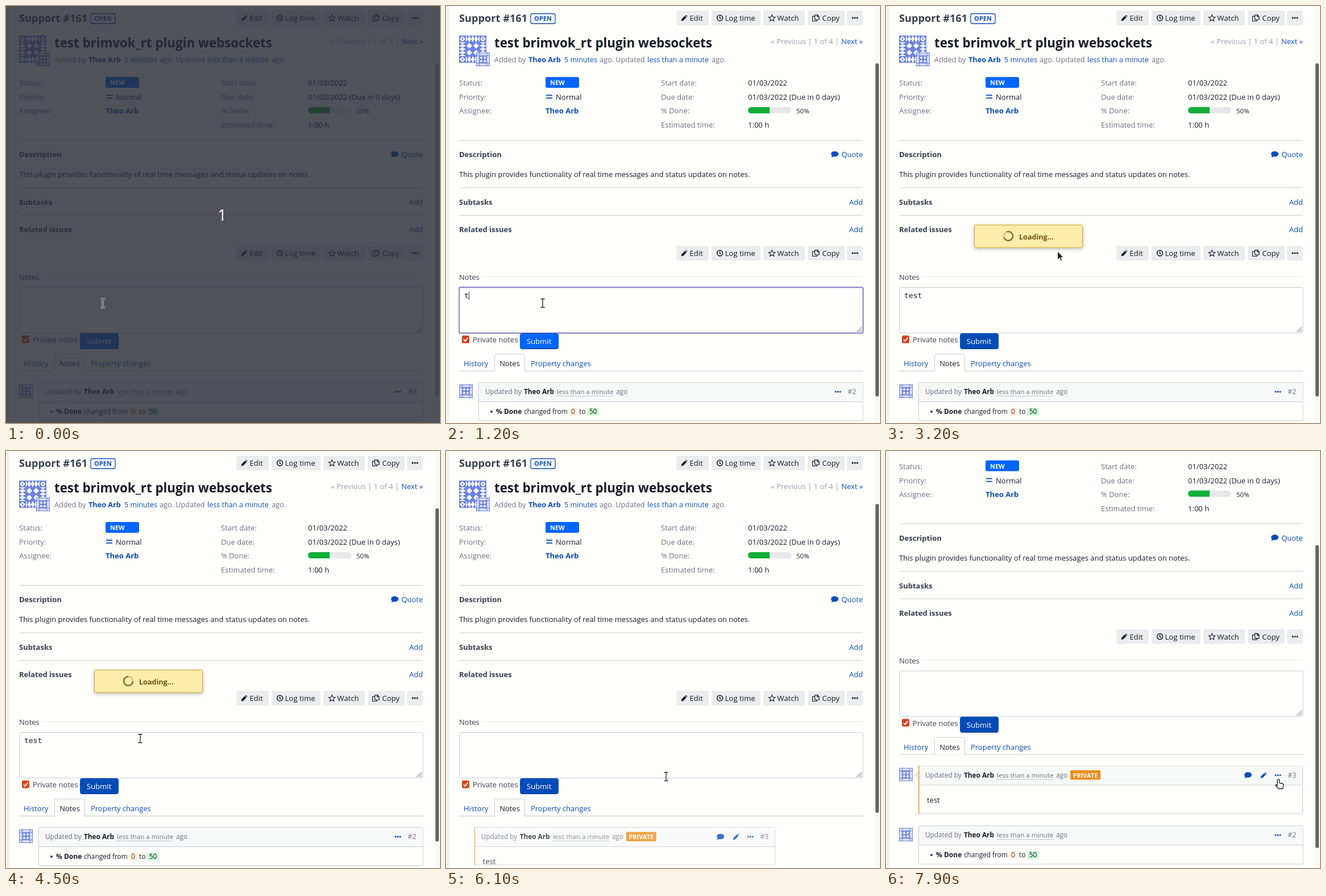
Animation of 763 by 734 pixels, one loop 8000 ms. Source, as an HTML page:

```html
<!DOCTYPE html>
<html lang="en">
<head>
<meta charset="utf-8">
<title>Issue notes</title>
<style>
  html, body { margin: 0; width: 100%; height: 100%; overflow: hidden; background: #fffffb; }
  svg { display: block; }
  text { font-family: 'Open Sans', 'Noto Sans', sans-serif; white-space: pre; }
  .mono { font-family: 'DejaVu Sans Mono', monospace; }
</style>
</head>
<body>
<script>
const INK = '#171b27', DARK = '#363e4f', GREY = '#687082', PALE = '#9a9fab',
      LINK = '#0a4bb8', BLUE = '#0065ff', EDGE = '#c8cbd6', BG = '#fffffb';
const NAME = 'Theo Arb';

// y is the middle of the capitals
const text = (x, y, s, fill = INK, size = 13, { bold, anchor = 'start' } = {}) =>
  `<text x="${x}" y="${Math.round(y + size * .36)}" fill="${fill}" font-size="${size}" text-anchor="${anchor}"` +
  `${bold ? ' font-weight="700"' : ''}>${s}</text>`;
const B = { bold: true }, MID = { anchor: 'middle' }, END = { anchor: 'end' };
const rect = (x, y, w, h, fill, r = 0, more = '') =>
  `<rect x="${x}" y="${y}" width="${w}" height="${h}" rx="${r}" fill="${fill}" ${more}/>`;
const line = (x1, y, x2, color = EDGE, more = '') =>
  `<path d="M${x1} ${y}H${x2}" stroke="${color}" fill="none" ${more}/>`;
const at = (x, y, s) => `<g transform="translate(${x} ${y})">${s}</g>`;

const dots = (x, y, c = INK) => [-4, 0, 4].map(d => rect(x + d - 1.4, y - 1.4, 2.8, 2.8, c, 1)).join('');
const pencil = (x, y, c = INK) => at(x - 5.5, y - 5.5,
  `<path fill="${c}" d="M0 11L.8 7.4 6.6 1.6 9.4 4.4 3.6 10.2ZM7.4.8q1-1 2 0l.8.8q1 1 0 2z"/>`);
const bubble = (x, y) => at(x, y,
  `<path fill="${LINK}" d="M-6.5-.5a6.5 4.8 0 1 1 6.5 4.8q-1.6 0-2.8-.4Q-4.5 5.5-6.5 5.5-5 4-5 2.6-6.5 1.2-6.5-.5z"/>`);
const clock = (x, y) => at(x, y,
  `<g fill="none" stroke="${INK}" stroke-width="1.5"><circle r="5"/><path d="M0-3V.4L2 1.6"/></g>`);
const star = (x, y) => {
  const pts = Array.from({ length: 10 }, (_, i) => {
    const r = i % 2 ? 2.7 : 6, a = i * Math.PI / 5;
    return `${(r * Math.sin(a)).toFixed(2)},${(-r * Math.cos(a)).toFixed(2)}`;
  });
  return at(x, y + .5, `<polygon points="${pts.join(' ')}" fill="none" stroke="${INK}" stroke-width="1.1"/>`);
};
const copy = (x, y) => at(x, y,
  `<path fill="none" stroke="${INK}" stroke-width="1.2" d="M-1.5-5.5H3L6-2.5V3H-1.5ZM2.5-5.5V-2H6M-1.5-2.8H-5.5V5.5H2V3"/>`);

const toolbar = y => [[405, 57], [467, 86], [558, 73], [636, 65], [705, 28]]
    .map(([x, w]) => rect(x, y - 13, w, 26, '#ebecee', 3)).join('') +
  pencil(419, y) + clock(481.5, y) + star(573, y) + copy(650, y) + dots(719, y) +
  [[440, 'Edit'], [517, 'Log time'], [601.5, 'Watch'], [676.5, 'Copy']]
    .map(([x, s]) => text(x, y, s, INK, 13.2, MID)).join('');

const avatar = (x, y, size) => `<use href="#avatar" x="${x}" y="${y}" width="${size}" height="${size}"/>`;
const quarter = `<path id="quarter" fill-rule="evenodd" d="M0 0H12V12H0ZM6 1L11 6 6 11 1 6Z
  M4 6L6 4 8 6 6 8ZM12 0H18L15 6ZM18 0H24L21 6ZM12 12L15 6 18 12ZM18 12L21 6 24 12Z
  M0 12L6 15 0 18ZM0 18L6 21 0 24ZM12 12L6 15 12 18ZM12 18L6 21 12 24Z
  M12 12H24V24H12ZM18 13L23 18 18 23 13 18Z"/>`;

const noteHead =
  text(12, 17, 'Updated by', GREY, 11.8) + text(80, 17, NAME, INK, 11.8, B) +
  text(138, 17, 'less than a minute', GREY, 11.6) +
  line(138, 24.5, 238, GREY, 'stroke-dasharray="1 1.5"') + text(242, 17, 'ago', GREY, 11.8);
const noteEnd = id => dots(-44, 17, LINK) + text(-12, 17, id, GREY, 12, END);
const beak = color => `<path d="M.5 11L-5 17 .5 23" fill="#f7f8f8" stroke="${color}"/>`;

const facts = [
  [23, 135, 'Status:'], [23, 160, 'Priority:'], [23, 184.5, 'Assignee:'],
  [378, 135, 'Start date:'], [378, 160, 'Due date:'], [378, 184.5, '% Done:'], [378, 209, 'Estimated time:'],
].map(([x, y, s]) => text(x, y, s, GREY)).join('');

const header =
  text(23, 21, 'Support #161', DARK, 18.2, B) +
  rect(149, 13.5, 43, 17.5, '#fff', 3, `stroke="${LINK}" stroke-width="1.3"`) +
  text(170.5, 22, 'OPEN', LINK, 11, { bold: true, anchor: 'middle' }) +
  toolbar(21) + avatar(23, 52, 48) + rect(53, 82, 24, 24, BG) + avatar(53, 82, 24) +
  text(85, 65, 'test brimvok_rt plugin websockets', INK, 22.3, B) +
  text(691, 62, '« Previous | 1 of 4 |', PALE, 13, END) + text(733, 62, 'Next »', LINK, 13, END) +
  text(85, 94, 'Added by', GREY, 12.7) + text(145, 94, NAME, LINK, 12.7, B) +
  text(208, 94, '5 minutes', LINK, 12.5) + text(270, 94, 'ago. Updated', GREY, 12.7) +
  text(354, 94, 'less than a minute', LINK, 12.6) + text(467, 94, 'ago.', GREY, 12.7);

const details = facts +
  rect(175, 125, 59, 19, BLUE, 3) + text(183, 135, 'NEW', '#fff', 11, B) +
  rect(176, 156, 11, 2, '#1a5fc0') + rect(176, 161, 11, 2, '#1a5fc0') + text(193, 160, 'Normal') +
  text(175, 184.5, NAME, LINK, 13, B) +
  text(531, 135, '01/03/2022') + text(531, 160, '01/03/2022 (Due in 0 days)') +
  rect(531, 178, 76, 11, '#e6e8ea', 5.5) + `<path fill="#12ae37" d="M569 178v11H536.5a5.5 5.5 0 0 1 0-11z"/>` +
  text(616, 185, '50%', INK, 11.5) + text(531, 209, '1:00 h') +
  [236.5, 320, 368.5].map(y => line(23, y, 733)).join('') +
  text(23, 261, 'Description', DARK, 13, B) + bubble(683.5, 261) + text(733, 261, 'Quote', LINK, 13, END) +
  text(23, 296, 'This plugin provides functionality of real time messages and status updates on notes.', INK, 12.93) +
  text(23, 345, 'Subtasks', DARK, 13, B) + text(733, 345, 'Add', LINK, 13, END) +
  text(23, 393.5, 'Related issues', DARK, 13, B) + text(733, 393.5, 'Add', LINK, 13, END) + toolbar(435);

const form =
  text(23, 477, 'Notes', DARK) + line(64, 476.5, 733, '#e8e9ea') +
  rect(23.5, 495.5, 709.5, 80, '#fffffd', 2, `stroke="${EDGE}"`) +
  `<g id="focus">${rect(22.5, 494.5, 711.5, 82, 'none', 3, 'stroke="#cfc6ea" stroke-width="2"')}
   ${rect(23.5, 495.5, 709.5, 80, 'none', 2, 'stroke="#7f70bd" stroke-width="1.3"')}</g>` +
  `<path d="M722 574l9-9M725.5 574l5.5-5.5M729 574l2-2" stroke="#666" fill="none"/>` +
  `<text id="typed" class="mono" x="32" y="514" font-size="13" fill="${INK}"></text>` +
  rect(0, 503, 1, 14, INK, 0, 'id="caret"') +
  rect(28, 580, 13, 13.5, '#d9431c', 2.5) +
  `<path d="M31 587l2.7 2.8 4.6-6" stroke="#fff" stroke-width="1.8" fill="none"/>` +
  text(47, 587, 'Private notes', DARK) +
  rect(130.5, 576.5, 67, 27, BLUE, 3, 'id="submit" stroke="#0a4fc4"') + line(132, 603.5, 196, '#073a8c') +
  text(163.5, 590, 'Submit', '#fff', 13.2, MID) +
  line(23, 642.5, 733) +
  `<path d="M85.5 643V615.5q0-3 3-3H135.5q3 0 3 3V643" fill="${BG}" stroke="${EDGE}"/>` +
  text(31, 629, 'History', LINK) + text(112, 629, 'Notes', INK, 13, MID) + text(149, 629, 'Property changes', LINK);

const oldNote = avatar(23, 666, 24) + at(57, 662,
  rect(.5, .5, 675.5, 67.5, BG, 2, `stroke="${EDGE}"`) + rect(1, 1, 674.5, 33, '#f7f8f8') + line(0, 34.5, 676) +
  beak('#e2e4e8') + noteHead + at(676, 0, noteEnd('#2')) +
  `<circle cx="23" cy="52" r="2" fill="${DARK}"/>` + text(31, 52, '% Done', INK, 12, B) +
  text(80, 52, 'changed from', INK, 11.8) + rect(160, 45, 13, 14, '#fdeedd', 2) + text(166.5, 52, '0', '#7a3a10', 12, MID) +
  text(177, 52, 'to', INK, 12) + rect(191, 45, 21, 14, '#cdf9d8', 2) + text(201.5, 52, '50', INK, 12, MID));

const newNote =
  `<g id="badge">${avatar(23, 666, 24)}${at(57, 662, beak('#f0a03c'))}</g>
  <svg id="note" y="662">
    ${rect(.5, .5, 0, 0, BG, 2, `id="frame" stroke="${EDGE}"`)}
    <rect id="bar" x="1" y="1" height="33" fill="#f7f8f8"/>
    ${line(0, 34.5, 676)}${noteHead}
    ${rect(267, 8.5, 53, 16.5, '#ee8a16', 1.5)}${text(293.5, 17, 'PRIVATE', '#fff', 11, { bold: true, anchor: 'middle' })}
    <g id="end">${bubble(-96.5, 17) + pencil(-69, 17, LINK) + noteEnd('#3')}</g>
    ${text(15, 60, 'test')}
    <rect width="1.5" height="85" fill="#f0961e"/>
  </svg>`;

const loading = `<g id="loading">
  ${rect(155.5, 385.5, 190, 39.5, '#feecac', 2, 'stroke="#d6a62c" filter="url(#shade)"')}
  <circle cx="215" cy="405" r="8" fill="none" stroke="#d5c587" stroke-width="2.6"/>
  <path id="spin" d="M215 397a8 8 0 1 1-8 8" fill="none" stroke="#85773d" stroke-width="2.6"/>
  ${text(234, 406, 'Loading...', '#6a5312', 12.6, B)}</g>`;

const beam = 'M-3.5-7.5H-1L0-6.5 1-7.5H3.5M0-6.5V6.5M-3.5 7.5H-1L0 6.5 1 7.5H3.5';
const pointers = {
  beam: `<g fill="none"><path d="${beam}" stroke="#fff" stroke-width="3"/>
    <path d="${beam}" stroke="#222" stroke-width="1.3"/></g>`,
  hand: `<path d="M-1.7 10V1.5a1.7 1.7 0 0 1 3.4 0V6.3L7 7.5q2 .5 1.7 3L7.5 16.5H0L-5 10.5q.2-2.3 3.3.6z"
    fill="#fff" stroke="#222" stroke-width="1.3" stroke-linejoin="round"/>`,
  arrow: `<path d="M0 0V15L3.5 11.8 6 17.3 8.4 16.2 6 11H10.7Z" fill="#222" stroke="#fff"/>`,
};

document.body.innerHTML = `<svg width="763" height="734" viewBox="0 0 763 734">
  <defs>${quarter}
    <symbol id="avatar" viewBox="0 0 48 48"><g fill="#6c82e0">
      ${[0, 90, 180, 270].map(a => `<use href="#quarter" transform="rotate(${a} 24 24)"/>`).join('')}</g></symbol>
    <filter id="shade" x="-10%" y="-30%" width="120%" height="180%">
      <feDropShadow dx="0" dy="2" stdDeviation="3" flood-opacity=".3"/></filter>
  </defs>
  ${rect(0, 0, 763, 734, BG)}
  <path d="M3.5 0V734" stroke="#d3d5dc"/>
  <g id="page">${header}${details}${form}<g id="old">${oldNote}</g>${newNote}</g>
  ${loading}
  ${rect(753, 0, 10, 734, '#f9f9f6')}
  ${rect(755, 0, 6, 0, '#666', 3, 'id="thumb"')}
  <g id="shroud">${rect(0, 0, 763, 734, '#282b34', 0, 'opacity=".81"')}${text(380, 368, '1', '#fff', 28, MID)}</g>
  <g id="pointer">${Object.entries(pointers).map(([k, s]) => `<g id="${k}">${s}</g>`).join('')}</g>
</svg>`;

const $ = id => document.getElementById(id);
const set = (id, attrs) => { for (const k in attrs) $(id).setAttribute(k, attrs[k]); };
const show = (id, on) => set(id, { display: on ? 'inline' : 'none' });

// time, x, y of the mouse
const path = [
  [0, 170, 523], [1900, 170, 523], [2100, 151, 570], [2500, 151, 570], [3300, 323, 412], [4200, 190, 412],
  [4500, 236, 506], [5100, 358, 524], [6000, 387, 573], [6300, 387, 573], [6600, 436, 537],
  [7100, 436, 537], [7900, 690, 578], [8000, 690, 578],
];
function mouse(t) {
  const i = path.findIndex(k => k[0] > t), [t0, x0, y0] = path[i - 1], [t1, x1, y1] = path[i];
  const u = (t - t0) / (t1 - t0);
  return [x0 + (x1 - x0) * u, y0 + (y1 - y0) * u];
}

const SENT = 2500, ANSWER = 5685, SCROLL = 7000;
function draw(t) {
  show('shroud', t < 100);

  const focus = t < 400 || t >= SENT ? 0 : t < 500 ? .5 : 1;
  const typed = t >= ANSWER ? 0 : [1200, 1300, 1400, 1600].filter(k => t >= k).length;
  set('focus', { opacity: focus });
  $('typed').textContent = 'test'.slice(0, typed);
  show('caret', t >= 400 && t < 2000);
  set('caret', { x: 32 + 7.83 * typed });
  set('submit', { fill: t >= 2100 ? '#044bb5' : BLUE });

  show('loading', t >= SENT && t < ANSWER);
  set('spin', { transform: `rotate(${t * .36 - 90} 215 405)` });

  // the new note unfolds in width, height, margin and opacity together
  const u = Math.min(1, Math.max(0, (t - ANSWER) / 600));
  const p = .5 - Math.cos(Math.PI * u) / 2, w = 676 * p, h = 85.5 * p;
  show('note', p > 0);
  show('badge', p === 1);
  set('note', { x: 23 + 34 * p, width: w, height: h, opacity: p });
  set('frame', { width: Math.max(0, w - 1), height: Math.max(0, h - 1) });
  set('bar', { width: Math.max(0, w - 2) });
  set('end', { transform: `translate(${w} 0)` });
  set('old', { transform: `translate(0 ${105.6 * p})` });

  const scroll = t >= SCROLL ? 108.4 : 0, full = 1036 + 105 * p;
  set('page', { transform: `translate(0 ${-scroll})` });
  set('thumb', {
    y: 784 * (133 + scroll) / full, height: 608000 / full,
    fill: t < 400 ? '#c6c6c6' : t < 500 ? '#959595' : '#646464',
  });

  const [x, y] = mouse(t);
  const kind = t >= 2100 && t <= 2500 || t >= 7800 ? 'hand' : t < 7200 && y > 490 ? 'beam' : 'arrow';
  for (const k in pointers) show(k, k === kind);
  set('pointer', { transform: `translate(${x} ${y})` });
}

function tick() {
  draw(Math.floor(performance.now() % 8000 / 100) * 100);
  requestAnimationFrame(tick);
}
tick();
</script>
</body>
</html>
```
